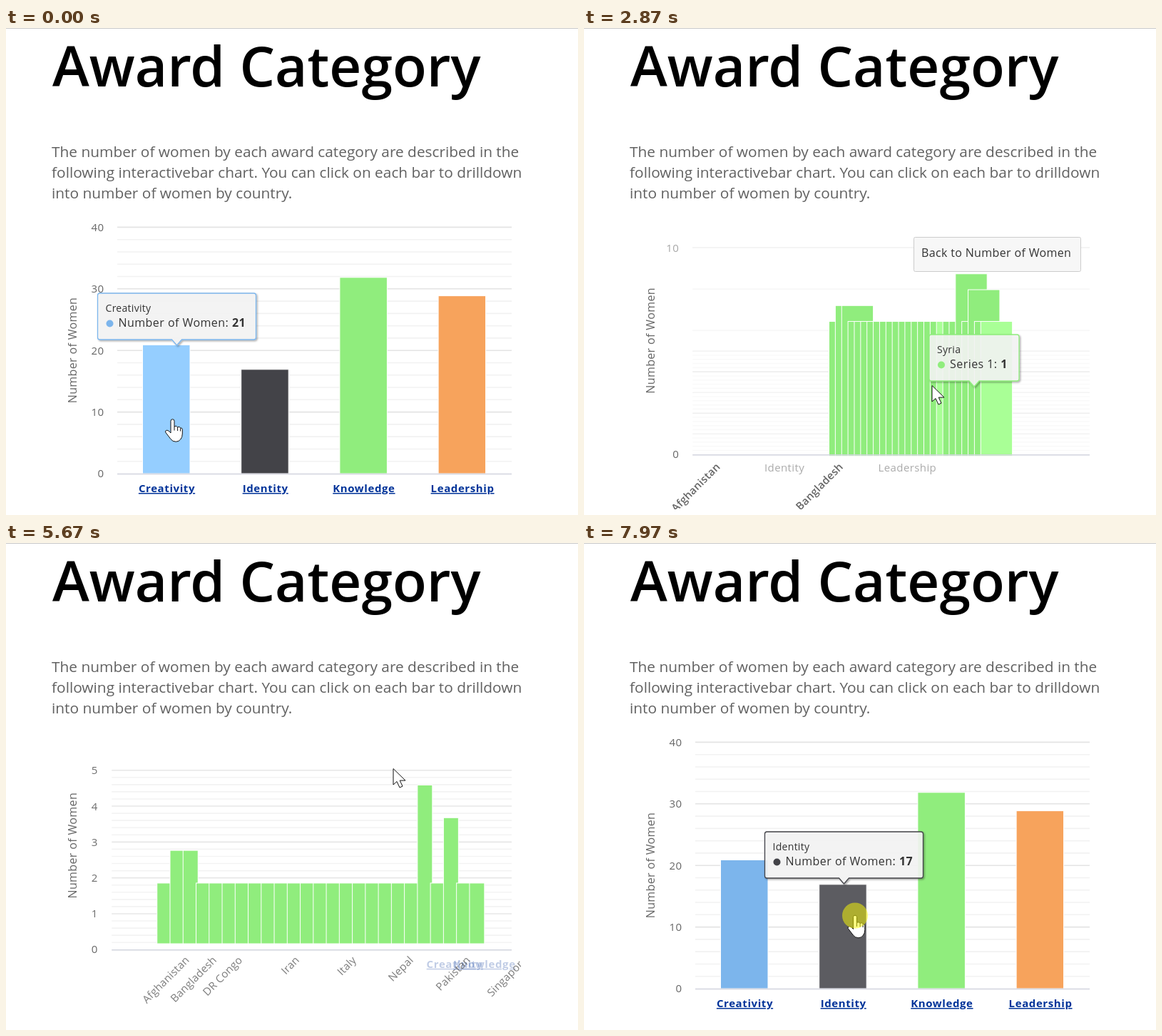
An HTML page for the animation above (8 s loop, 802 px wide and 683 px high).

```html
<!DOCTYPE html>
<html lang="en">
<head>
<meta charset="utf-8">
<title>Award Category</title>
<style>
html, body { margin: 0; width: 100%; height: 100%; overflow: hidden; background: #fff; }
svg { display: block; width: 802px; height: 683px; font-family: "Open Sans", "Noto Sans", sans-serif; }
.title { font-size: 78.3px; font-weight: 600; }
.intro { font-size: 20.85px; fill: #616161; }
.tick { font-size: 15px; fill: #666; letter-spacing: .4px; text-anchor: end; }
.axis { font-size: 16px; fill: #666; letter-spacing: .35px; text-anchor: middle; }
.link { font-size: 15px; font-weight: 700; fill: #039; letter-spacing: .6px; text-anchor: middle; text-decoration: underline; }
.plain { font-size: 15px; fill: #666; letter-spacing: .4px; text-anchor: middle; }
.country { font-size: 15px; fill: #666; letter-spacing: .2px; text-anchor: end; }
.head { font-size: 14px; fill: #333; letter-spacing: .3px; }
.body { font-size: 16px; fill: #333; letter-spacing: .45px; white-space: pre; }
.button { font-size: 16px; fill: #333; letter-spacing: .35px; }
</style>
</head>
<body>
<svg viewBox="0 0 802 683">
  <defs>
    <clipPath id="chartArea"><rect x="80" y="264" width="642" height="411"/></clipPath>
    <filter id="shadow" x="-10%" y="-20%" width="120%" height="150%">
      <feDropShadow dx="1.5" dy="1.5" stdDeviation="1.2" flood-color="#000" flood-opacity=".35"/>
    </filter>
  </defs>
  <rect width="802" height="683" fill="#fff"/>
  <rect width="802" height="1" fill="#c8c8c8"/>
  <text class="title" x="65" y="82">Award Category</text>
  <g class="intro">
    <text x="64" y="181">The number of women by each award category are described in the</text>
    <text x="64" y="210">following interactivebar chart. You can click on each bar to drilldown</text>
    <text x="64" y="239">into number of women by country.</text>
  </g>
  <g id="chart" clip-path="url(#chartArea)"></g>
  <g id="overlay"></g>
</svg>
<script>
const LOOP = 8000;
const DRILL_DOWN = 2637, DRILL_UP = 5510, FADE_IN = 5985;
const categories = [
  { name: 'Creativity', value: 21, color: '#7cb5ec', lit: '#95ceff' },
  { name: 'Identity', value: 17, color: '#434348', lit: '#5c5c61' },
  { name: 'Knowledge', value: 32, color: '#90ed7d', lit: '#a9ff96' },
  { name: 'Leadership', value: 29, color: '#f7a35c', lit: '#ffbc75' }
].map((c, i) => ({ ...c, x: 191.5 + 138.2 * i, y: 625 - 8.6 * c.value, w: 66.5 }));
const [creativity, identity, knowledge] = categories;
const countries = ['Afghanistan', 'Bangladesh', 'DR Congo', 'Iran', 'Italy', 'Nepal', 'Pakistan',
  'Singapore', 'Syria', 'UAE', 'UK', 'US', 'Yemen'];
const countryValue = i => ({ 1: 2, 2: 2, 20: 4, 22: 3 })[i] || 1;

// [time, x, y] of the pointer tip
const pointerPath = [[0, 233.5, 549], [80, 233.5, 549], [230, 229, 548], [780, 229, 548], [1400, 488, 501.5],
  [4510, 488, 501.5], [5120, 543, 316.5], [6790, 543, 316.5], [6840, 547, 326], [7580, 380, 522.5]];
// [time, x, y] of the tooltip tip
const tooltipPath = [[0, 239.5, 445], [80, 239.5, 445], [410, 227, 445], [1050, 227, 445], [1270, 364.5, 478],
  [1290, 364.5, 478], [1540, 502.5, 351], [2640, 502.5, 351], [2870, 547, 503], [3050, 517, 507],
  [5000, 502.5, 351], [7430, 502.5, 351], [7650, 364.5, 478]];
const tooltips = [[0, 1050, creativity], [1050, 1290, identity], [1290, 2640, knowledge],
  [2640, 3380, null], [7000, 7430, knowledge], [7430, LOOP, identity]];
const clicks = [[2410, 2640], [5280, 5510], [7890, LOOP]];

const clamp = v => Math.min(1, Math.max(0, v));
const mix = (a, b, p) => a + (b - a) * p;
const ease = p => .5 - Math.cos(Math.PI * clamp(p)) / 2;
const progress = (t, start, span = 500) => ease((t - start) / span);
const within = (t, [from, to]) => t >= from && t < to;

function along(path, t) {
  const n = path.findIndex(k => k[0] > t);
  if (n < 0) return path[path.length - 1].slice(1);
  const a = path[n - 1], b = path[n], p = ease((t - a[0]) / (b[0] - a[0]));
  return [mix(a[1], b[1], p), mix(a[2], b[2], p)];
}

const text = (cls, x, y, str, extra = '') => `<text class="${cls}" x="${x}" y="${y}" ${extra}>${str}</text>`;
const bar = (x, top, w, bottom, fill, opacity = 1) =>
  `<rect x="${x}" y="${top}" width="${w}" height="${bottom - top}" fill="${fill}" stroke="#fff" opacity="${opacity}"/>`;

function grid(u) {
  const left = mix(156, 147, u), labelX = mix(137.5, 127.5, u);
  let lines = '', labels = '';
  const ticks = (step, count, lineOpacity, labelOpacity) => {
    for (let k = 1; k <= count; k++) {
      const v = k * step, y = mix(625 - 8.64 * v, 562 - 56.6 * v, u), major = k % 5 === 0;
      if (y < 278) continue;
      lines += `<path d="M${left} ${y}H709" stroke="${major ? '#e4e4e4' : '#f2f2f2'}" stroke-width="1.6" opacity="${lineOpacity}"/>`;
      if (major) labels += text('tick', labelX, y + 5.5, Math.round(v), `opacity="${labelOpacity}"`);
    }
  };
  if (u < 1) ticks(2, 20, 1 - u, 1 - u);
  if (u > 0) ticks(.2, 25, u, clamp((u - .5) * 2.6));
  const zero = mix(625, 562, u), titleY = mix(452, 420, u);
  return lines + labels + text('tick', labelX, zero + 5, 0)
    + text('axis', 99, titleY, 'Number of Women', `transform="rotate(-90 99 ${titleY})"`);
}

const axisLine = u => `<path d="M${mix(156, 147, u)} ${mix(625.5, 562.5, u)}H709" stroke="#d2d4de" stroke-width="1.6"/>`;

function categoryLabels(u, goingUp) {
  return categories.map((c, i) => {
    const shared = i % 2 === 0, center = 225.5 + 138.2 * i;
    if (u === 0) return text('link', center, 651, c.name);
    if (u === 1 || (shared && !goingUp)) return '';
    const x = mix(center, shared ? 701 : 157.5 + 22.5 * i, u);
    const opacity = !goingUp ? 1 - u : shared ? clamp((1 - u) * 1.6) : clamp(1 - u / .7);
    return text(goingUp ? 'link' : 'plain', x, mix(651, 586, u), c.name, `opacity="${opacity}"`);
  }).join('');
}

function countryLabels(u, goingUp) {
  if (u === 0) return '';
  return countries.map((name, n) => {
    const i = n * 2, shared = n < 2, center = 225.5 + 138.2 * i;
    const outer = !goingUp ? center - 10 : shared ? 792 : center;
    const x = mix(outer, 163 + 22.5 * i, u);
    const y = mix(goingUp ? 605 : 644, 582.5, u);
    const opacity = goingUp ? u : shared ? 1 : clamp((u - .45) / .55);
    const weight = !goingUp && shared && u < 1 ? 600 : 400;
    return text('country', x, y, name, `opacity="${opacity}" font-weight="${weight}" transform="rotate(-45 ${x} ${y})"`);
  }).join('');
}

function bars(t, active) {
  if (within(t, [DRILL_DOWN, FADE_IN])) {
    const goingUp = t >= DRILL_UP;
    const q = progress(t, 2655) - progress(t, 5528);
    let out = '';
    for (let i = 0; i < 25; i++) {
      const lit = (i === 24 && t < 3050) || (i === 17 && t < 3300);
      out += bar(mix(knowledge.x, 152.2 + 22.5 * i, q), mix(knowledge.y, 563 - 56.5 * countryValue(i), q),
        mix(knowledge.w, 10.4, q), goingUp ? 562 : mix(625, 562, q), lit ? knowledge.lit : knowledge.color);
    }
    return out;
  }
  const fade = t < FADE_IN ? 1 : clamp((t - FADE_IN) / 300);
  return categories.map(c =>
    bar(c.x, c.y, c.w, 625, c === active ? c.lit : c.color, c === knowledge ? 1 : fade)).join('');
}

function backButton(t, [px, py]) {
  if (!within(t, [DRILL_DOWN, DRILL_UP])) return '';
  const hover = px > 462 && px < 697 && py > 293 && py < 342;
  return `<rect x="462.5" y="293.5" width="234" height="48" rx="2" fill="${hover ? '#e6e6e6' : '#f7f7f7'}" stroke="#ccc"/>`
    + text('button', 473, 321, 'Back to Number of Women');
}

function tooltip(t, shown) {
  if (!shown) return '';
  const point = shown[2], [x, y] = along(tooltipPath, t);
  const half = point ? 111 : 63, color = (point || knowledge).color;
  const name = point ? point.name : 'Syria', series = point ? 'Number of Women' : 'Series 1';
  const value = point ? point.value : 1;
  const opacity = point ? 1 : 1 - clamp((t - 3200) / 180);
  return `<g transform="translate(${x} ${y})" opacity="${opacity}">
    <path d="M${3 - half} -73H${half - 3}q3 0 3 3V-11q0 3 -3 3H7L0 0L-7 -8H${3 - half}q-3 0 -3 -3V-70q0 -3 3 -3z"
      fill="#f7f7f7" fill-opacity=".87" stroke="${color}" stroke-width="1.3" filter="url(#shadow)"/>
    ${text('head', 11 - half, -47, name)}
    <circle cx="${17 - half}" cy="-30.5" r="5" fill="${color}"/>
    ${text('body', 29 - half, -26, `${series}: <tspan font-weight="700">${value}</tspan>`)}</g>`;
}

function pointer(t, [x, y]) {
  const onBar = !within(t, [DRILL_DOWN, FADE_IN])
    && categories.some(c => x > c.x && x < c.x + c.w && y > c.y && y < 625);
  const hand = 'M-2.5 2.2a2.5 2.5 0 0 1 5 0V10q2.5-2 4.6 .8q2.6-1.4 4 1q2.4-.4 2.7 2.4V20q0 5-2.6 8q-2.4 3.2-6.5 3.2'
    + 'q-4.6 0-7.2-3.6L-9.8 18q-.8-2.2 1.6-2.8q2.2-.2 4 2L-2.5 19z';
  const arrow = 'M0 0V22.5L5 18L9 26.5L13 24.6L9.2 16.6H17z';
  return `<g transform="translate(${x} ${y})" stroke="#111" stroke-linejoin="round">
    <path d="${onBar ? hand : arrow}" fill="#fff"/>
    ${onBar ? '<path d="M2.5 10V15.5M7.1 11V16M11.1 12.2V16.5" fill="none"/>' : ''}</g>`;
}

const chart = document.getElementById('chart'), overlay = document.getElementById('overlay');

function render(t) {
  const goingUp = t >= DRILL_UP;
  const axisU = goingUp ? 1 - progress(t, 5553) : progress(t, 2645);
  const labelU = goingUp ? 1 - progress(t, 5544) : progress(t, DRILL_DOWN);
  const tip = along(pointerPath, t);
  const shown = tooltips.find(s => within(t, s));
  chart.innerHTML = grid(axisU) + bars(t, shown && shown[2]) + axisLine(axisU)
    + categoryLabels(labelU, goingUp) + countryLabels(labelU, goingUp);
  const click = clicks.some(c => within(t, c))
    ? `<circle cx="${tip[0]}" cy="${tip[1]}" r="18" fill="#ff0" opacity=".5"/>` : '';
  overlay.innerHTML = backButton(t, tip) + tooltip(t, shown) + pointer(t, tip) + click;
}

function frame() {
  render(performance.now() % LOOP);
  requestAnimationFrame(frame);
}
frame();
</script>
</body>
</html>
```
